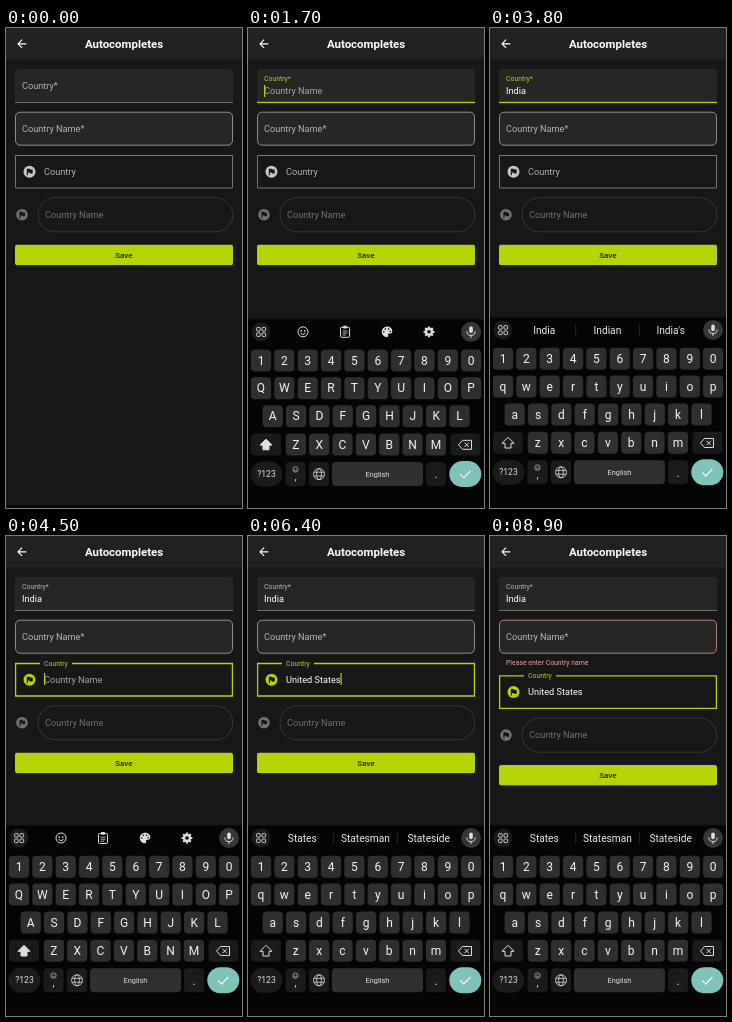
An HTML page for the animation above (9000 ms loop, 236 by 480 pixels).

```html
<!DOCTYPE html>
<html lang="en">
<head>
<meta charset="utf-8">
<title>Autocompletes</title>
<style>
html, body { margin: 0; width: 100%; height: 100%; overflow: hidden; background: #171717; }
svg { display: block; width: 236px; height: 480px; font-family: Roboto, "Noto Sans", sans-serif; }
text { white-space: pre; }
</style>
</head>
<body>
<svg id="stage" viewBox="0 0 236 480" xmlns="http://www.w3.org/2000/svg"></svg>
<script>
const NS = 'http://www.w3.org/2000/svg';
const LOOP = 9000;
const LIME = '#b6d404', FILL = '#252725', KEY = '#2d2f30', DIM = '#1a1b1c', PALE = '#dcdfdf';
const BODY = 9.17, SMALL = 6.88;
const stage = document.getElementById('stage');

function set(el, attrs) {
  for (const k in attrs) el.setAttribute(k, attrs[k]);
  return el;
}
function add(parent, tag, attrs) {
  return parent.appendChild(set(document.createElementNS(NS, tag), attrs));
}
const group = (parent, attrs = {}) => add(parent, 'g', attrs);
const box = (parent, x, y, width, height, fill, rx = 0, more = {}) =>
  add(parent, 'rect', { x, y, width, height, fill, rx, ...more });
const dot = (parent, cx, cy, r, fill) => add(parent, 'circle', { cx, cy, r, fill });
const line = (parent, d, stroke = PALE, width = 1) =>
  add(parent, 'path', { d, stroke, fill: 'none', 'stroke-width': width, 'stroke-linejoin': 'round' });
// y is the middle of the capitals
function label(parent, str, x, y, size, fill, more = {}) {
  const el = add(parent, 'text', { x, y: y + size * 0.355, 'font-size': size, fill, ...more });
  el.textContent = str;
  return el;
}
const mid = (parent, str, x, y, size, fill, more = {}) =>
  label(parent, str, x, y, size, fill, { 'text-anchor': 'middle', ...more });
const show = (el, on) => set(el, { opacity: +on });

const ramp = (t, from, to) => Math.min(1, Math.max(0, (t - from) / (to - from)));
const easeOut = p => 1 - (1 - p) * (1 - p);
const smooth = p => p * p * (3 - 2 * p);
const mix = (a, b, p) => a + (b - a) * p;
const within = (t, ...spans) => spans.some(([a, b]) => t >= a && t < b);
const latest = (t, steps) => steps.reduce((now, [at, v]) => (t >= at ? v : now), steps[0][1]);

function flagIcon(parent, x, y, r, color, hole) {
  const g = group(parent, { transform: `translate(${x} ${y}) scale(${r / 6})` });
  const disc = dot(g, 0, 0, 6, color);
  add(g, 'path', { d: 'M-2.7 3.6V-3H.5L.9-2.1H3.2V1.7H.4L0 .8H-1.6V3.6Z', fill: hole });
  return disc;
}

// Page
box(stage, 0, 0, 236, 480, '#171717');
box(stage, 0, 0, 236, 31.5, '#202120');
line(stage, 'M20.3 15.8H12.2M16.1 11.7L12 15.8L16.1 19.9', '#fff', 1.2);
mid(stage, 'Autocompletes', 118, 16.2, 11.46, '#fff', { 'font-weight': 600 });

const first = group(stage);
add(first, 'path', { d: 'M9 75V43.3Q9 41 11.3 41H224.7Q227 41 227 43.3V75Z', fill: FILL });
const rule = box(first, 9, 74.3, 218, 0.7, '#8d8f8d');
const label1 = label(first, 'Country*', 16, 57.4, BODY, '#b4b6b4');
const hint1 = label(first, 'Country Name', 16, 62.4, BODY, '#a4a6a4');
const value1 = label(first, '', 16, 62.4, BODY, '#fff');

const second = group(stage);
const frame2 = box(second, 9.5, 84.2, 217, 33, FILL, 4.5, { stroke: '#a9aba9', 'stroke-width': 0.8 });
label(second, 'Country Name*', 16, 100.4, BODY, '#b4b6b4');
const error = label(second, 'Please enter Country name', 16, 126.4, SMALL, '#e8a49c');

const lower = group(stage);
const frame3 = line(lower, '', '#8d8f8d', 0.8);
const icon3 = flagIcon(lower, 23.5, 143.7, 6, '#c6c8c6', '#171717');
const label3 = label(lower, 'Country', 38, 143.3, BODY, '#b4b6b4');
const hint3 = label(lower, 'Country Name', 38, 143.3, BODY, '#a4a6a4');
const value3 = label(lower, '', 38, 143.3, BODY, '#fff');

flagIcon(lower, 16, 186.7, 5.8, '#717371', '#171717');
box(lower, 32, 169.8, 194.8, 34, 'none', 17, { stroke: '#424442', 'stroke-width': 0.7 });
label(lower, 'Country Name', 39, 186.3, BODY, '#6f716f');

const clip = add(add(stage, 'defs', {}), 'clipPath', { id: 'button' });
box(clip, 9, 216.5, 218, 20.7, '#fff', 2.3);
const button = group(lower, { 'clip-path': 'url(#button)' });
box(button, 9, 216.5, 218, 20.7, LIME);
const ripple = dot(button, 156, 227, 20, '#5f7000');
mid(lower, 'Save', 117.8, 227, 8.02, '#20240a', { 'font-weight': 500 });

const cursor = box(stage, 0, 0, 1.2, 12, LIME);

function dropdown(y, str) {
  const g = group(stage);
  box(g, 8.5, y, 219, 34, '#000', 2.5, { 'fill-opacity': 0.3 });
  box(g, 9, y, 218, 33, '#151615', 2.3);
  label(g, str, 18, y + 16.6, BODY, '#fff');
  return g;
}
const menu1 = dropdown(79, 'India');
const menu3 = dropdown(164.8, 'United States');

// Keyboard
const keyboard = group(stage);
box(keyboard, 0, 289.5, 236, 200, '#050505');
const letters = [];
const PITCH = 23.35;

function key(x, y, w, fill = KEY, h = 22, r = 4) {
  box(keyboard, x - w / 2, y - h / 2, w, h, fill, r);
}
function keyRow(chars, x, y) {
  [...chars].forEach((ch, i) => {
    const cx = x + i * PITCH;
    key(cx, y, 20.2);
    const el = mid(keyboard, ch, cx, y, 12, '#f4f5f5');
    if (/[a-z]/.test(ch)) letters.push([el, ch]);
  });
}
keyRow('1234567890', 13, 330.8);
keyRow('qwertyuiop', 13, 358.4);
keyRow('asdfghjkl', 24.7, 386.4);
keyRow('zxcvbnm', 47.8, 414.8);

key(18, 414.8, 30, DIM);
const shift = line(keyboard, 'M18 409.3L24 415.3H21V420H15V415.3H12Z');
key(217.5, 414.8, 30, DIM);
line(keyboard, 'M210.5 415L214.5 410.5H223.5V419.5H214.5ZM216.5 412.8L220.9 417.2M220.9 412.8L216.5 417.2');

const BASE = 444.3;
key(18.5, BASE, 32, DIM, 25, 12.5);
mid(keyboard, '?123', 18.5, BASE, 8.6, PALE);
key(47.5, BASE, 20.2, DIM, 24);
function smiley(parent, x, y, r, w) {
  add(parent, 'circle', { cx: x, cy: y, r, fill: 'none', stroke: PALE, 'stroke-width': w });
  dot(parent, x - r * 0.35, y - r * 0.2, r * 0.17, PALE);
  dot(parent, x + r * 0.35, y - r * 0.2, r * 0.17, PALE);
  line(parent, `M${x - r * 0.5} ${y + r * 0.25}q${r * 0.5} ${r * 0.6} ${r} 0`, PALE, w);
}
smiley(keyboard, 47.5, 439.6, 2.7, 0.6);
mid(keyboard, ',', 47.5, 446, 11, PALE);
key(71, BASE, 20.2, DIM, 24);
line(keyboard, 'M65.5 444.3a5.5 5.5 0 1 0 11 0a5.5 5.5 0 1 0-11 0M68.6 444.3a2.4 5.5 0 1 0 4.8 0a2.4 5.5 0 1 0-4.8 0M66 442.4H76M66 446.2H76', PALE, 0.8);
key(129.5, BASE, 91, KEY, 24);
mid(keyboard, 'English', 129.5, BASE, 7.4, PALE);
key(188, BASE, 20.2, DIM, 24);
mid(keyboard, '.', 188, 444.3, 12, PALE);
key(217.3, BASE, 32, '#80c3bb', 26, 13);
line(keyboard, 'M212.3 444.5L215.8 448L222.4 441', '#f2fffd', 1.2);

// Strip above the keys
const STRIP = 302;
dot(keyboard, 13, STRIP, 9.5, '#1b1c1d');
for (const x of [8.6, 14]) for (const y of [297.6, 303])
  box(keyboard, x, y, 3.6, 3.6, 'none', 0.8, { stroke: PALE, 'stroke-width': 0.9 });
dot(keyboard, 223, STRIP, 10, '#343638');
box(keyboard, 221.2, 296.5, 3.6, 6.8, PALE, 1.8);
line(keyboard, 'M218.9 301.5a4.1 4.1 0 0 0 8.2 0M223 305.6V308');

const tools = group(keyboard);
smiley(tools, 55, STRIP, 5, 1);
box(tools, 92.5, 297.5, 9, 10, 'none', 1, { stroke: PALE });
box(tools, 95, 296, 4, 2.8, PALE, 0.8);
line(tools, 'M94.6 301.2H99.4M94.6 303.2H99.4M94.6 305.2H98', PALE, 0.8);
add(tools, 'path', { d: 'M139 296.7a5.3 5.3 0 1 0 0 10.6c1.6 0 1.4-1.3 1-2q-.4-1.5 1.2-1.5h1.4q1.7-.2 1.7-2.3c0-2.8-2.4-4.8-5.3-4.8Z', fill: PALE });
[[135.8, 302], [137.3, 299.3], [140.6, 299.3], [142.2, 301.7]].forEach(([x, y]) => dot(tools, x, y, 0.8, '#050505'));
for (let a = 0; a < 180; a += 45)
  box(tools, 179.9, 296.6, 2.2, 10.8, PALE, 0.5, { transform: `rotate(${a} 181 302)` });
dot(tools, 181, STRIP, 4, PALE);
dot(tools, 181, STRIP, 1.8, '#050505');

const words = group(keyboard);
line(words, 'M85.7 297V307M149.3 297V307', '#35373a', 0.8);
const slots = [54.3, 117.4, 180.7].map(x => mid(words, '', x, STRIP, 10.2, '#e8eaea'));

box(stage, 0, 477, 236, 3, '#0c0507');

const WORDS = [
  [0, ''], [2220, 'I If Ice'], [3420, "India Indian India's"], [4280, ''],
  [5320, 'U I Y'], [6380, 'States Statesman Stateside']
];
const TEXT1 = [[0, ''], [2220, 'I'], [3300, 'India']];
const TEXT3 = [[0, ''], [5320, 'U'], [5900, 'United States']];
const BLINK = [[1400, 1900], [2100, 2700], [3300, 3800], [4280, 4800],
  [5300, 6900], [7400, 7900], [8400, 8900]];

function render(t) {
  const focus1 = within(t, [1320, 4180]), focus3 = t >= 4180;
  const up1 = smooth(ramp(t, 1320, 1490)), up3 = smooth(ramp(t, 4180, 4345));
  const dy = t >= 7240 ? 12.4 : 0;

  set(label1, {
    y: mix(57.4 + BODY * 0.355, 51 + SMALL * 0.355, up1),
    'font-size': mix(BODY, SMALL, up1), fill: focus1 ? LIME : '#b4b6b4'
  });
  set(rule, focus1 ? { y: 73.8, height: 1.3, fill: LIME } : { y: 74.3, height: 0.7, fill: '#8d8f8d' });
  show(hint1, up1 * (1 - ramp(t, 2220, 2370)));
  value1.textContent = latest(t, TEXT1);
  show(menu1, within(t, [2220, 3300]));

  set(label3, {
    y: mix(143.3 + BODY * 0.355, 127.4 + SMALL * 0.355, up3),
    'font-size': mix(BODY, SMALL, up3), fill: focus3 ? LIME : '#b4b6b4'
  });
  const gap = 16 * up3;
  set(frame3, {
    d: gap ? `M${50 + gap} 127.5H226.4V160H9.6V127.5H${50 - gap}` : 'M9.5 127.5H226.5V160H9.5Z',
    stroke: focus3 ? LIME : '#8d8f8d', 'stroke-width': focus3 ? 1.3 : 0.8, 'stroke-linejoin': 'miter'
  });
  set(icon3, { fill: focus3 ? LIME : '#c6c8c6' });
  show(hint3, up3 * (1 - ramp(t, 5320, 5490)));
  value3.textContent = latest(t, TEXT3);
  show(menu3, within(t, [5320, 5900]));
  set(lower, { transform: `translate(0 ${dy})` });

  const warn = ramp(t, 7260, 7430);
  set(error, { y: 124.5 + 1.9 * warn + SMALL * 0.355, opacity: warn });
  const tint = ramp(t, 7300, 7450);
  set(frame2, {
    stroke: `rgb(${mix(169, 226, tint)},${mix(171, 152, tint)},${mix(169, 144, tint)})`
  });
  set(ripple, {
    r: 20 + Math.max(0, t - 7220) * 0.45,
    opacity: t < 7220 ? 0 : 0.38 * (1 - ramp(t, 7400, 7700))
  });

  const width = focus3 ? value3.getComputedTextLength() : value1.getComputedTextLength();
  set(cursor, {
    x: (focus3 ? 38 : 16) + width, y: focus3 ? 137 + dy : 57,
    opacity: +within(t, ...BLINK)
  });

  set(keyboard, { transform: `translate(0 ${191 * (1 - easeOut(ramp(t, 1340, 1740)))})` });
  show(keyboard, t >= 1340);
  const upper = within(t, [0, 2220], [4280, 5320]);
  for (const [el, ch] of letters) el.textContent = upper ? ch.toUpperCase() : ch;
  set(shift, { fill: upper ? PALE : 'none' });
  const list = latest(t, WORDS);
  show(tools, !list);
  show(words, !!list);
  list.split(' ').forEach((w, i) => { slots[i].textContent = w; });
}

const start = performance.now();
function tick() {
  render((performance.now() - start) % LOOP);
  requestAnimationFrame(tick);
}
tick();
</script>
</body>
</html>
```
